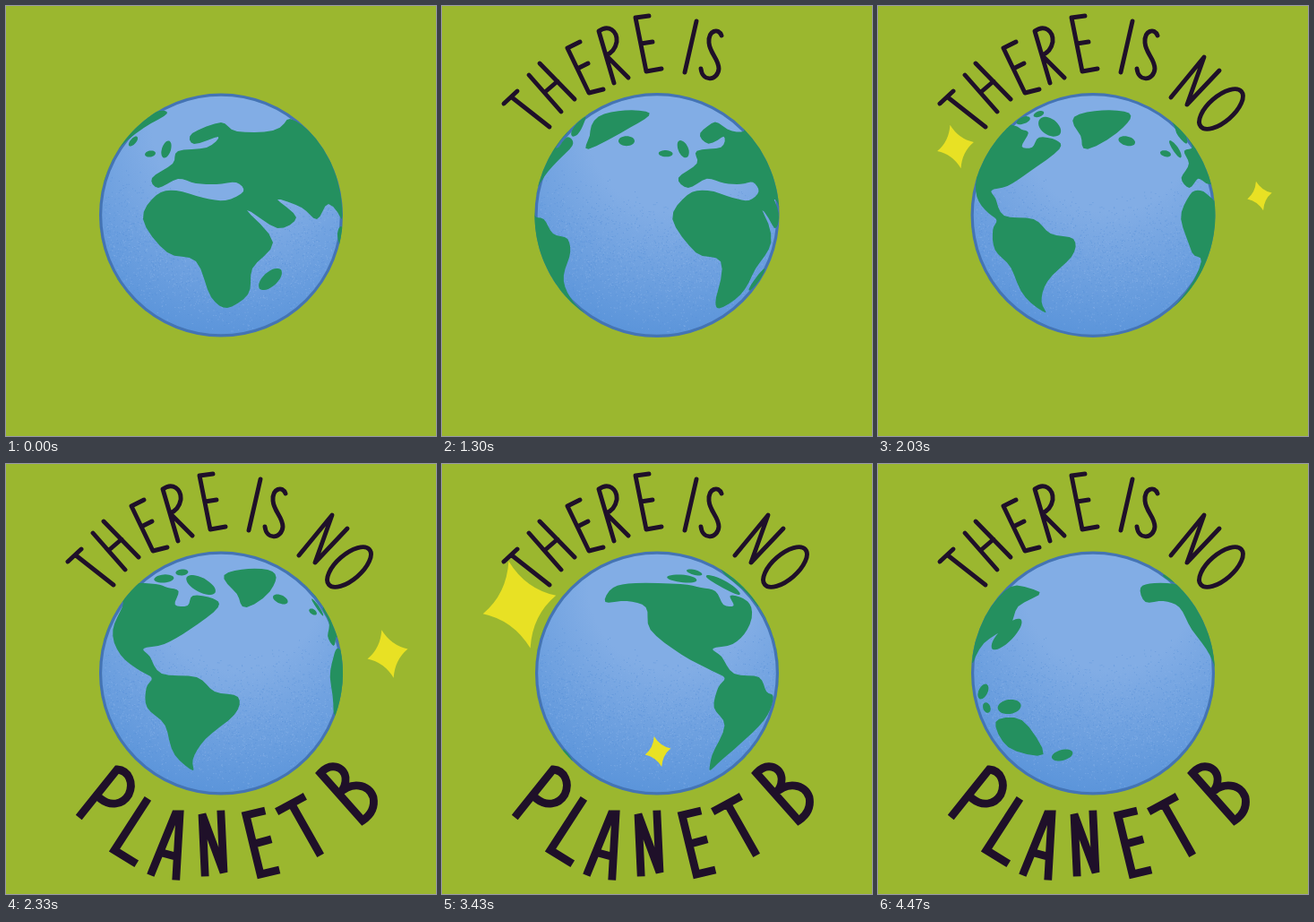
Animation, 480 px wide and 480 px high, one loop 4.51 s. Source, as an HTML page:

```html
<!DOCTYPE html>
<html lang="en">
<head>
<meta charset="utf-8">
<title>There is no planet B</title>
<style>
html, body { margin: 0; width: 100%; height: 100%; overflow: hidden; background: #9bb72f; }
svg { display: block; width: 100vw; height: 100vh; }
.word { fill: none; stroke: #1f1029; stroke-width: 4.9; stroke-linecap: round; stroke-linejoin: round; }
.bold { stroke-width: 8.8; stroke-linecap: square; stroke-linejoin: miter; stroke-miterlimit: 2; }
</style>
</head>
<body>
<svg viewBox="0 0 480 480" role="img" aria-label="There is no planet B">
  <defs>
    <radialGradient id="sea" gradientUnits="userSpaceOnUse" cx="258" cy="135" r="238">
      <stop offset=".4" stop-color="#82ade5"/>
      <stop offset="1" stop-color="#5a94da"/>
    </radialGradient>
  </defs>
  <rect width="480" height="480" fill="#9bb72f"/>
  <g id="globe">
    <circle cx="240" cy="233.5" r="134.4" fill="url(#sea)" stroke="#4474b4" stroke-width="3.2"/>
    <path id="light" fill="#8db5ea" opacity=".5"/>
    <path id="dark" fill="#4f8bd4" opacity=".45"/>
    <path id="land" fill="#24905f"/>
  </g>
  <g id="stars" fill="#e8e124"></g>
  <path class="word" d="M69 109 84 95M78 102 120 135
    M97 77 133 118M109 64 148 104M115 96 129 84
    M154 40 140 47 164 97 180 93M151 70 163 64
    M192 86 175 28C186 20 196 28 195 40Q193 51 183 55L208 80
    M231 11 216 13 228 73 245 70M222 42 235 40"/>
  <path class="word" d="M284 17 271 74M312 33C309 24 297 27 298 41C299 53 309 59 309 70C308 83 291 86 289 70"/>
  <g class="word">
    <path d="M327 102 364 57 345 110 381 72"/>
    <ellipse cx="383" cy="115" rx="30" ry="14" transform="rotate(-41 383 115)"/>
  </g>
  <path class="word bold" d="M84 391 124 341C137 342 143 356 137 369C130 381 116 382 106 374
    M156 377 121 431 142 444
    M163 455 189 391 194 391 190 460M174 434 189 438
    M222 456 219 391 243 456 240 391
    M285 388 268 392 284 458 301 454M277 424 292 420
    M306 386 330 373M319 380 349 433
    M351 345C362 333 377 337 379 350Q380 360 372 368C385 354 405 357 410 372Q413 388 398 398Z"/>
</svg>
<script>
const CX = 240, CY = 233.5, R = 136, LOOP = 4510, STEP = 100 / 3, LAST = 134;
const RAD = Math.PI / 180, NS = "http://www.w3.org/2000/svg";
const $ = id => document.getElementById(id);
const clamp = (v, a, b) => Math.max(a, Math.min(b, v));
const ring = y => Math.sqrt(Math.max(0, R * R - (y - CY) ** 2));

// Turn of the globe in degrees: speeds up, then settles
const turnAt = t => t * (22.3 + t * (12.3 - 1.23 * t));

// A screen point seen at a given turn becomes [longitude, y]
const lift = (turn, x, y) => [Math.asin(clamp((x - CX) / (ring(y) || 1), -1, 1)) / RAD - turn, y];

function coast(turn, text) {
  return text.trim().split(/\s*,\s*/).map(p => lift(turn, ...p.split(" ").map(Number)));
}

function island(turn, x, y, rx, ry, tilt = 0) {
  const c = Math.cos(tilt * RAD), s = Math.sin(tilt * RAD);
  return Array.from({ length: 8 }, (_, i) => {
    const u = rx * Math.cos(i * Math.PI / 4), v = ry * Math.sin(i * Math.PI / 4);
    return lift(turn, x + u * c - v * s, y + u * s + v * c);
  });
}

// Turn of the globe with each side of the world in view
const EAST = 0, ATLANTIC = 103, WEST = 171, PACIFIC = 235;

const LANDS = [
  // Africa, Europe and Asia
  coast(EAST, `153 238,168 211,190 206,220 214,245 217,265 207,257 197,235 199,212 198,192 193,
    170 203,163 192,186 176,192 162,224 158,237 146,210 154,208 142,240 130,258 140,298 139,317 126,
    346 148,372 203,375 238,360 221,347 238,330 225,303 216,324 236,303 248,269 228,298 264,275 293,
    270 322,247 337,229 325,212 285,180 275`),
  // The Americas
  [...coast(WEST, "181 154,190 138,215 133,265 134,288 138"),
   ...coast(ATLANTIC, `192 142,188 157,202 158,208 147,230 150,236 160,204 185,176 201,153 206,160 215,
     173 234,212 238,232 254,258 260,254 280,222 307,208 330,208 342,188 325,177 292,157 272,156 250,162 239`),
   ...coast(WEST, "300 231,266 213,231 185,226 160,205 153")],
  // Greenland, East Asia, Australia
  coast(ATLANTIC, "243 124,270 117,297 120,298 136,268 160,257 145"),
  coast(PACIFIC, "105 222,118 170,148 137,180 143,156 159,146 180,118 200"),
  coast(PACIFIC, "131 288,160 286,184 324,145 316"),
  island(EAST, 295, 305, 16, 8, -42),
  island(EAST, 161, 165, 6, 3.5, -10),
  island(EAST, 179, 160, 5, 10, 18),
  island(EAST, 374, 256, 4, 10),
  island(47, 206, 151, 9, 5.5),
  island(ATLANTIC, 176, 128, 11, 4.5, -5),
  island(ATLANTIC, 196, 121, 7, 3.5, -5),
  island(ATLANTIC, 217, 135, 18, 8, 28),
  island(PACIFIC, 143, 190, 23, 8, -46),
  island(PACIFIC, 117, 254, 5, 9, 25),
  island(PACIFIC, 121, 272, 4, 6, -20),
  island(PACIFIC, 146, 271, 13, 8, -8),
  island(PACIFIC, 205, 325, 12, 6, -15)
].map(smooth);

// Closed Catmull-Rom curve through the points
function smooth(p) {
  const out = [], n = p.length, parts = 4;
  for (let i = 0; i < n; i++) {
    const [a, b, c, d] = [-1, 0, 1, 2].map(k => p[(i + k + n) % n]);
    for (let j = 0; j < parts; j++) {
      const u = j / parts;
      out.push([0, 1].map(k => b[k] + u / 2 * (c[k] - a[k] +
        u * (2 * a[k] - 5 * b[k] + 4 * c[k] - d[k] + u * (3 * (b[k] - c[k]) + d[k] - a[k])))));
    }
  }
  return out;
}

function outline(points, turn) {
  return "M" + points.map(([lon, y]) => {
    const x = CX + ring(y) * Math.sin(clamp(lon + turn, -90, 90) * RAD);
    return x.toFixed(1) + " " + y.toFixed(1);
  }).join("L") + "Z";
}

// Fine grain on the sea
let seed = 7;
const rnd = () => (seed = seed * 16807 % 2147483647) / 2147483647;
function grain(count, mid, spread) {
  let d = "";
  for (let i = 0; i < count; i++) {
    const x = CX + (rnd() * 2 - 1) * 132;
    const y = mid + (rnd() + rnd() - 1) * spread - Math.abs(x - 255) * .25;
    if (Math.hypot(x - CX, y - CY) < 131) d += `M${x.toFixed(1)} ${y.toFixed(1)}h1v1h-1z`;
  }
  return d;
}
$("light").setAttribute("d", grain(1600, 305, 75));
$("dark").setAttribute("d", grain(1400, 285, 80));

// Twinkles: first peak and half width in steps, full size
const BEAT = 10, BEATS = 8, FIRST = 43;
const STARS = [
  { x: 241, y: 321, peak: 46, half: 3.7, size: 1.2 },
  { x: 426, y: 212, peak: 49.4, half: 2.6, size: .59, from: 49 },
  { x: 86.5, y: 157, peak: 53, half: 3, size: 1 }
];
for (const s of STARS) {
  s.el = document.createElementNS(NS, "path");
  s.el.setAttribute("d", "M0-50Q11-15 42 0Q11 15 0 50Q-11 15-42 0Q-11-15 0-50Z");
  $("stars").append(s.el);
}

function starSize(s, n) {
  if (n < (s.from || FIRST)) return 0;
  const k = clamp(Math.round((n - s.peak) / BEAT), 0, BEATS - 1);
  const d = Math.abs(n - s.peak - k * BEAT) / s.half;
  return d < 1 ? s.size * Math.cos(d * Math.PI / 2) : 0;
}

const words = document.querySelectorAll(".word");

function draw(ms) {
  const n = Math.min(LAST, Math.floor((ms % LOOP + 3.4) / STEP));
  const t = n * STEP / 1000, turn = turnAt(t);
  const swell = 1 + .011 * Math.exp(-(((t - 1.65) / .35) ** 2));
  $("globe").setAttribute("transform", `translate(${CX} ${CY}) scale(${swell}) translate(${-CX} ${-CY})`);
  $("land").setAttribute("d", LANDS.map(l => outline(l, turn)).join(""));
  for (const s of STARS)
    s.el.setAttribute("transform", `translate(${s.x} ${s.y}) rotate(-14) scale(${starSize(s, n)})`);
  // One word every half second
  words.forEach((w, i) => w.style.display = n >= 18 + 15 * i ? "" : "none");
}

const start = performance.now();
function tick() {
  draw(performance.now() - start);
  requestAnimationFrame(tick);
}
tick();
</script>
</body>
</html>
```
